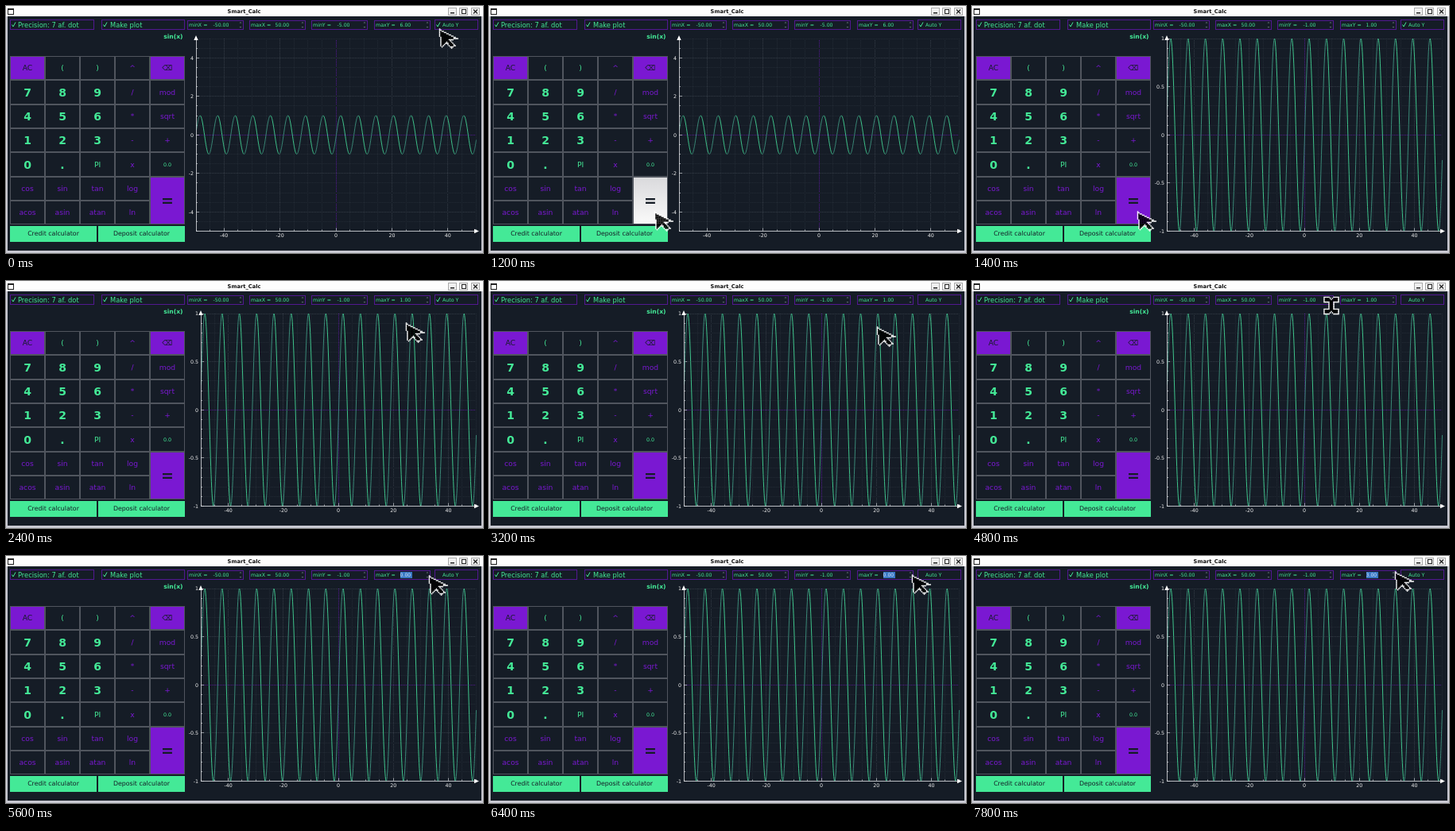
An HTML page with a canvas for the animation above (8 s loop, 600 by 311 pixels).

```html
<!DOCTYPE html>
<html lang="en">
<head>
<meta charset="utf-8">
<title>Smart_Calc</title>
<style>
html, body { margin: 0; width: 100%; height: 100%; overflow: hidden; background: #151c26; }
canvas { display: block; }
</style>
</head>
<body>
<canvas id="stage" width="600" height="311"></canvas>
<script>
const ctx = document.getElementById('stage').getContext('2d');
const LOOP = 8000, STEP = 200;
const BG = '#151c26', GREEN = '#44e997', PURPLE = '#7a18d2', DIM = '#521890', GREY = '#50555e';

// Pointer path: time, x, y
const path = [
  [0, 544, 29], [200, 544, 29], [1000, 207, 259], [1400, 207, 259],
  [2400, 502, 53], [2800, 545, 25], [3000, 545, 25], [3800, 172, 233],
  [4000, 202, 247], [4200, 202, 247], [4800, 452, 31], [5200, 531, 26],
  [5600, 531, 25], [6400, 531, 24], [6800, 531, 20], [8000, 531, 20]
];

function rect(x, y, w, h, fill, stroke) {
  if (fill) { ctx.fillStyle = fill; ctx.fillRect(x, y, w, h); }
  if (stroke) {
    ctx.strokeStyle = stroke;
    ctx.lineWidth = 1;
    ctx.strokeRect(x + .5, y + .5, w - 1, h - 1);
  }
}

function line(points, color, width = 1, dash = []) {
  ctx.beginPath();
  points.forEach(([x, y]) => ctx.lineTo(x, y));
  ctx.strokeStyle = color;
  ctx.lineWidth = width;
  ctx.setLineDash(dash);
  ctx.stroke();
  ctx.setLineDash([]);
}

function text(str, x, y, size, color, align = 'left', bold = false) {
  ctx.font = `${bold ? 'bold ' : ''}${size}px "DejaVu Sans", sans-serif`;
  ctx.fillStyle = color;
  ctx.textAlign = align;
  ctx.textBaseline = 'alphabetic';
  ctx.fillText(str, x, y + size * .365);
}

function drawWindow() {
  rect(0, 0, 600, 311, '#c9c9d2');
  rect(2, 13, 596, 295, BG);
  rect(0, 0, 600, 13, '#fdfdfd');
  text('Smart_Calc', 299.5, 7, 6.7, '#111', 'center', true);
  rect(2, 3, 8, 8, '#fff', '#222');
  rect(2, 3, 8, 2, '#222');
  for (const x of [556, 570, 585]) rect(x, 2, 11, 10, '#f0f0f0', '#aaa');
  rect(559, 8, 5, 1.5, '#222');
  rect(573, 4, 6, 6, null, '#222');
  line([[588, 4.5], [593, 9.5]], '#222', 1.2);
  line([[593, 4.5], [588, 9.5]], '#222', 1.2);
}

function checkBox(label, x, w, textX, size, checked = true) {
  rect(x, 17, w, 13, null, DIM);
  if (checked) line([[x + 2.5, 23.5], [x + 4, 26], [x + 7, 20.5]], GREEN, 1);
  text(label, textX, 23.5, size, GREEN);
}

function spinBox(label, value, x, selected) {
  rect(x, 18, 71, 12, null, DIM);
  text(label + ' =', x + 2, 23.5, 6.3, GREEN);
  if (selected) rect(x + 33, 20, 15, 8, '#3978c4');
  text(value.toFixed(2), x + 32.5, 23.5, 6.2, selected ? '#d5e6ff' : GREEN);
  for (const [y, tip] of [[21.5, -1.5], [26, 1.5]]) {
    ctx.fillStyle = '#68717c';
    ctx.beginPath();
    ctx.moveTo(x + 65.5, y);
    ctx.lineTo(x + 68.5, y);
    ctx.lineTo(x + 67, y + tip);
    ctx.fill();
  }
}

function drawKeypad(pressed) {
  const rows = ['AC ( ) ^ ⌫', '7 8 9 / mod', '4 5 6 * sqrt', '1 2 3 - +',
                '0 . PI x 0.0', 'cos sin tan log =', 'acos asin atan ln'];
  const top = r => Math.round(63 + r * 30.3);
  rows.forEach((row, r) => row.split(' ').forEach((key, c) => {
    const x = 5 + c * 44, y = top(r), equals = key === '=';
    const h = top(r + (equals ? 2 : 1)) - y;
    const filled = equals || key === 'AC' || key === '⌫';
    let fill = filled ? PURPLE : BG;
    if (equals && pressed) {
      fill = ctx.createLinearGradient(0, y, 0, y + h);
      fill.addColorStop(0, '#d9d9dc');
      fill.addColorStop(1, '#fafafa');
    }
    rect(x, y, 44, h, fill, GREY);
    const bold = /^[\d.=]$/.test(key);
    const size = equals ? 19 : bold ? 14 : key === '0.0' ? 6.3 : 9.2;
    const green = bold || /^(\(|\)|PI|0\.0)$/.test(key);
    text(key, x + 22, y + h / 2, size, filled ? BG : green ? GREEN : PURPLE, 'center', bold);
  }));
  rect(5, 63, 220, 212, null, GREY);
  rect(5, 277, 109, 20, GREEN);
  rect(116, 277, 109, 20, GREEN);
  text('Credit calculator', 59.5, 286.5, 7.85, BG, 'center');
  text('Deposit calculator', 170.5, 286.5, 7.85, BG, 'center');
}

function drawPlot(limit) {
  const zoomed = limit === 1, left = zoomed ? 245 : 239, right = 591, top = 41, bottom = 283.5;
  const px = x => left + (x + 50) / 100 * (right - left);
  const py = y => (top + bottom) / 2 - y / limit * (bottom - top) / 2;
  const crisp = v => Math.floor(v) + .5;
  const major = zoomed ? .5 : 2, perMajor = zoomed ? 5 : 4, sub = major / perMajor;
  const gridColor = (value, main) => value === 0 ? DIM : main ? '#343c46' : '#222a34';

  for (let x = -50; x <= 50; x += 5) {
    const main = x % 20 === 0, gx = crisp(px(x));
    line([[gx, top], [gx, bottom]], gridColor(x, main), 1, [1, 1]);
    line([[gx, bottom], [gx, bottom - (main ? 4 : 2)]], '#c8ccd0', .7);
    if (main) text(String(x), px(x), 289, 6.3, '#eee', 'center');
  }
  const count = Math.round(limit / sub);
  for (let i = -count; i <= count; i++) {
    const main = i % perMajor === 0, gy = crisp(py(i * sub));
    line([[left, gy], [right, gy]], gridColor(i, main), 1, [1, 1]);
    line([[left, gy], [left + (main ? 4 : 2), gy]], '#c8ccd0', .7);
    if (main) text(String(i * sub), left - 3, py(i * sub), 6.3, '#eee', 'right');
  }

  // Rising flanks are dimmer than falling ones.
  const halfWave = Math.PI, firstTurn = -16.5 * Math.PI;
  for (let k = 0; k < 33; k++) {
    const from = Math.max(-50, firstTurn + k * halfWave);
    const to = Math.min(50, firstTurn + (k + 1) * halfWave);
    const flank = [];
    for (let n = 0; n <= 30; n++) {
      const x = from + (to - from) * n / 30;
      flank.push([px(x) + .5, py(Math.sin(x))]);
    }
    line(flank, Math.cos((from + to) / 2) > 0 ? '#3a8877' : '#3fc58c', 1);
  }

  line([[left + .5, top], [left + .5, bottom]], '#e0e3e6', .8);
  line([[left, bottom], [right, bottom]], '#e0e3e6', .8);
  ctx.fillStyle = '#fff';
  ctx.beginPath();
  ctx.moveTo(left, 37);
  ctx.lineTo(left + 2.7, 43);
  ctx.lineTo(left - 2.7, 43);
  ctx.moveTo(595, bottom);
  ctx.lineTo(589, bottom - 2.7);
  ctx.lineTo(589, bottom + 2.7);
  ctx.fill();
}

const arrow = new Path2D('M2 2 L20 11.5 L13 13.5 L19 20.5 L16 22.5 L10.5 16 L4.5 21 Z');
const beam = new Path2D('M-8 -9 H-3 L0 -7 L3 -9 H8 V-6 H1.5 V6 H8 V9 H3 L0 7 L-3 9 H-8 V6 H-1.5 V-6 H-8 Z');

// Samples the outline on a coarse grid for the blocky, enlarged look.
function drawPointer(x, y, shape) {
  const cell = 1.5;
  ctx.lineWidth = 3.2;
  for (let v = -12; v < 27; v += cell) for (let u = -12; u < 27; u += cell) {
    const inside = ctx.isPointInPath(shape, u, v);
    if (inside || ctx.isPointInStroke(shape, u, v)) {
      rect(x + u - cell / 2, y + v - cell / 2, cell + .1, cell + .1, inside ? '#000' : '#fff');
    }
  }
}

function pointerAt(t) {
  const i = path.findIndex((key, n) => n && t < key[0]);
  const [t0, x0, y0] = path[i - 1], [t1, x1, y1] = path[i];
  const p = (t - t0) / (t1 - t0), ease = p * p * (3 - 2 * p);
  return [Math.round(x0 + (x1 - x0) * ease), Math.round(y0 + (y1 - y0) * ease)];
}

function maxYAt(t) {
  if (t < 1400) return 6;
  if (t < 5600) return 1;
  return t < 6600 ? 0 : t < 7000 ? 1 : t < 7400 ? 2 : 3;
}

function draw(t) {
  const scaled = t >= 1400;
  drawWindow();
  checkBox('Precision: 7 af. dot', 5, 106, 15, 8.3);
  checkBox('Make plot', 120, 105, 131, 8.3);
  text('sin(x)', 222.5, 38.5, 7.6, GREEN, 'right', true);
  drawKeypad((t >= 1000 && t < 1400) || t === 4000);
  spinBox('minX', -50, 228);
  spinBox('maxX', 50, 306);
  spinBox('minY', scaled ? -1 : -5, 384);
  spinBox('maxY', maxYAt(t), 463, t >= 5600);
  checkBox('Auto Y', 539, 55, 549, 6.3, t < 3000);
  drawPlot(scaled ? 1 : 5);
  drawPointer(...pointerAt(t), t >= 4800 && t < 5200 ? beam : arrow);
}

function tick() {
  draw(Math.floor(performance.now() % LOOP / STEP) * STEP);
  requestAnimationFrame(tick);
}
tick();
</script>
</body>
</html>
```
